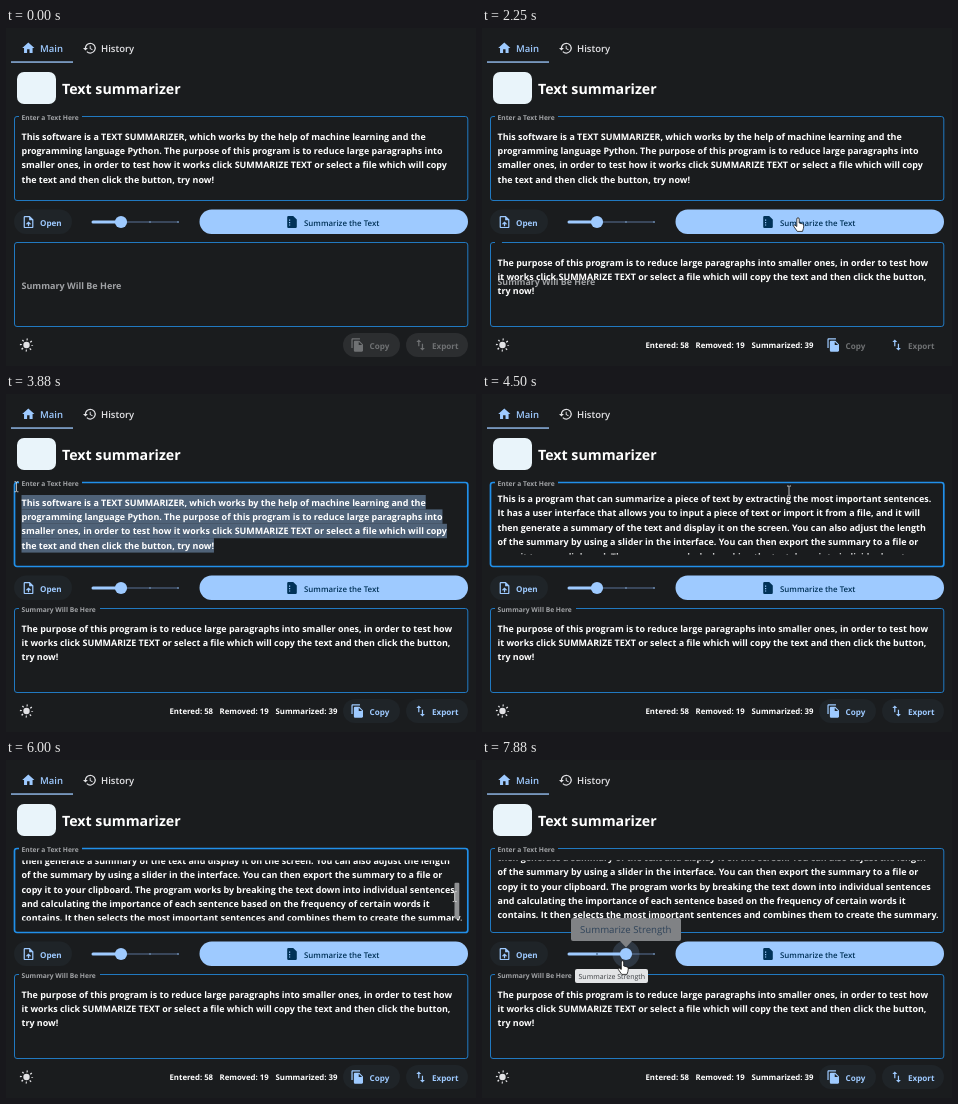
An HTML page that plays this animation: 470x338 px, repeating every 8 s.

```html
<!DOCTYPE html>
<html lang="en">
<head>
<meta charset="utf-8">
<title>Text summarizer</title>
<style>
  html, body { margin: 0; width: 100%; height: 100%; overflow: hidden; background: #1a1c1e; }
  svg { display: block; width: 100vw; height: 100vh; font-family: "Open Sans", "Noto Sans", sans-serif; text-rendering: geometricPrecision; }
  .body { font-size: 8.95px; font-weight: 700; fill: #fff; }
  .tab { font-size: 9.5px; font-weight: 600; }
  .label { font-size: 6.7px; font-weight: 700; fill: #a0a2a5; }
  .btn { font-size: 8.1px; font-weight: 700; }
  .stat { font-size: 7.8px; font-weight: 700; fill: #fff; }
  .field { fill: none; stroke: #2179c1; }
  .field.focus { stroke: #2190ea; stroke-width: 1.7; }
  .accent { fill: #9ecaff; }
  .gap { fill: #1a1c1e; }
</style>
</head>
<body>
<svg viewBox="0 0 470 338">
  <defs>
    <clipPath id="view"><rect x="10" y="100.4" width="450" height="60.2"/></clipPath>
  </defs>

  <!-- tabs and title -->
  <path class="accent" transform="translate(15 12.7) scale(.61)" d="M10 20v-6h4v6h5v-8h3L12 3 2 12h3v8z"/>
  <text class="tab accent" x="34" y="23.8">Main</text>
  <rect class="accent" x="5" y="33.4" width="62" height="1.3"/>
  <path fill="#e2e2e5" transform="translate(76.4 12.8) scale(.61)" d="M13 3a9 9 0 0 0-9 9H1l4 4 4-4H6a7 7 0 1 1 2 5l-1.4 1.4A9 9 0 1 0 13 3zm-1 5v5l4.3 2.5.7-1.2-3.5-2.1V8z"/>
  <text class="tab" fill="#e2e2e5" x="95" y="23.8">History</text>
  <rect x="11" y="44" width="39" height="32" rx="7" fill="#e9f4fa"/>
  <text x="56" y="66" font-size="14.2" font-weight="700" fill="#fff">Text summarizer</text>

  <!-- input -->
  <rect id="inBox" class="field" x="8.5" y="88.5" width="453.3" height="84" rx="2.5"/>
  <rect class="gap" x="13" y="87" width="63" height="4"/>
  <text class="label" x="15.5" y="92.2">Enter a Text Here</text>
  <g clip-path="url(#view)">
    <g id="sel" fill="#9ecaff" opacity=".4"></g>
    <g id="shortText" class="body"></g>
    <g id="longText" class="body"></g>
  </g>
  <rect id="thumb" x="448.5" y="100" width="4.8" height="36" rx="1" fill="#8f9193"/>

  <!-- controls -->
  <rect x="8" y="181.5" width="58" height="24.5" rx="12.2" fill="#1f2428"/>
  <path class="accent" transform="translate(15.2 186.7) scale(.61)" d="M14 2H6a2 2 0 0 0-2 2v16c0 1.1.9 2 2 2h12a2 2 0 0 0 2-2V8l-6-6zm4 18H6V4h7v5h5v11zM8 15l1.4 1.4 1.6-1.6V19h2v-4.2l1.6 1.6L16 15l-4-4z"/>
  <text class="btn accent" x="34" y="197.5">Open</text>
  <rect x="193.5" y="181.5" width="268.5" height="24.5" rx="12.2" class="accent"/>
  <path fill="#003258" fill-rule="evenodd" transform="translate(278.8 186.8) scale(.6)" d="M14 2H6a2 2 0 0 0-2 2v16a2 2 0 0 0 2 2h12a2 2 0 0 0 2-2V8zM7 8h2v2H7zM7 12h2v2H7zM7 16h2v2H7z"/>
  <text x="298" y="197.5" font-size="7.9" font-weight="600" fill="#003258">Summarize the Text</text>

  <!-- summary -->
  <rect class="field" x="8.5" y="214.5" width="453.3" height="84" rx="2.5"/>
  <rect id="outGap" class="gap" x="13" y="213" height="3"/>
  <text id="outLabel" class="label" x="15.5">Summary Will Be Here</text>
  <g id="outText" class="body"></g>

  <!-- footer -->
  <g fill="#e2e2e5">
    <circle cx="20.5" cy="317" r="3.2"/>
    <circle cx="20.5" cy="317" r="5.6" fill="none" stroke="#e2e2e5" stroke-width="2" stroke-dasharray="1.2 3.198" stroke-dashoffset=".6"/>
  </g>
  <g id="stats" class="stat">
    <text x="163.5" y="320.3">Entered: 58</text>
    <text x="213.5" y="320.3">Removed: 19</text>
    <text x="269.5" y="320.3">Summarized: 39</text>
  </g>
  <g class="out">
    <rect x="337" y="305" width="57" height="24" rx="12"/>
    <path transform="translate(344.2 309.7) scale(.61)" d="M16 1H4C2.9 1 2 1.9 2 3v14h2V3h12V1zm-1 4l6 6v10c0 1.1-.9 2-2 2H8a2 2 0 0 1-2-2V7c0-1.1.9-2 2-2h7zm-1 7h5.5L14 6.5V12z"/>
    <text class="btn" x="363.5" y="320.5">Copy</text>
  </g>
  <g class="out">
    <rect x="400" y="305" width="62" height="24" rx="12"/>
    <path transform="translate(407.3 309.7) scale(.61)" d="M9 3L5 7h3v7h2V7h3L9 3zm7 14v-7h-2v7h-3l4 4 4-4h-3z"/>
    <text class="btn" x="426" y="320.5">Export</text>
  </g>

  <!-- slider -->
  <path stroke="#39465a" stroke-width="2.2" stroke-linecap="round" d="M87 194H172"/>
  <path id="active" stroke="#9ecaff" stroke-width="3" stroke-linecap="round"/>
  <circle id="tick" cy="194" r=".9"/>
  <circle cx="172" cy="194" r=".9" fill="#6c89ad"/>
  <circle id="halo" cy="194" r="13.5" class="accent" opacity=".16"/>
  <circle id="knob" cy="194" r="6.1" class="accent"/>
  <g id="value">
    <path fill="#808285" d="M91 158H197a2 2 0 0 1 2 2V179a2 2 0 0 1-2 2H150L144 187.5 138 181H91a2 2 0 0 1-2-2V160a2 2 0 0 1 2-2z"/>
    <text x="98" y="173" font-size="9.65" fill="#2f445a">Summarize Strength</text>
  </g>
  <g id="hint">
    <rect x="93" y="209" width="73" height="14" rx="2" fill="#e3e4e6"/>
    <text x="96.5" y="218.7" font-size="7" fill="#3c3f43">Summarize Strength</text>
  </g>

  <!-- pointers -->
  <g id="pointer" fill="#fff" stroke="#111" stroke-width=".8" stroke-linejoin="round">
    <path id="arrow" d="M0 0v11l2.6-2.4 1.7 3.8 1.6-.7-1.7-3.7h3.5z"/>
    <path id="hand" d="M-1.2 1a1.2 1.2 0 0 1 2.4 0V5l3.4.9q1.3.4 1.2 2l-.4 2.6-.9 2.9h-5.2l-3.4-4.8q-.5-1.4.7-1.7l2.2 1.6z"/>
    <path id="beam" fill="none" stroke="#e8e8e8" d="M-2-5h1.4l.6.6.6-.6H2M0-4.4V4.4M-2 5h1.4L0 4.4l.6.6H2"/>
  </g>
</svg>
<script>
const $ = id => document.getElementById(id);
const LOOP = 8000, STEP = 125, LEAD = 14.4;

function make(parent, tag, attrs) {
  const el = document.createElementNS('http://www.w3.org/2000/svg', tag);
  set(el, attrs);
  return parent.appendChild(el);
}
function set(el, attrs) {
  for (const k in attrs) el.setAttribute(k, attrs[k]);
}
function show(id, on) { $(id).style.display = on ? '' : 'none'; }
function write(id, y, rows) {
  return rows.map((row, i) => {
    const el = make($(id), 'text', { x: 15.5, y: y + i * LEAD });
    el.textContent = row;
    return el;
  });
}

const rows = write('shortText', 111.5, [
  'This software is a TEXT SUMMARIZER, which works by the help of machine learning and the',
  'programming language Python. The purpose of this program is to reduce large paragraphs into',
  'smaller ones, in order to test how it works click SUMMARIZE TEXT or select a file which will copy',
  'the text and then click the button, try now!'
]);
write('longText', 107.9, [
  'This is a program that can summarize a piece of text by extracting the most important sentences.',
  'It has a user interface that allows you to input a piece of text or import it from a file, and it will',
  'then generate a summary of the text and display it on the screen. You can also adjust the length',
  'of the summary by using a slider in the interface. You can then export the summary to a file or',
  'copy it to your clipboard. The program works by breaking the text down into individual sentences',
  'and calculating the importance of each sentence based on the frequency of certain words it',
  'contains. It then selects the most important sentences and combines them to create the summary.'
]);
write('outText', 237.5, [
  'The purpose of this program is to reduce large paragraphs into smaller ones, in order to test how',
  'it works click SUMMARIZE TEXT or select a file which will copy the text and then click the button,',
  'try now!'
]);
const marks = rows.map((_, i) => make($('sel'), 'rect', { y: 101 + i * LEAD, height: LEAD }));

const clamp = v => Math.min(1, Math.max(0, v));
const ease = (t, from, to) => {
  const p = clamp((t - from) / (to - from));
  return p * p * (3 - 2 * p);
};
const mix = (a, b, p) => a + (b - a) * p;

// time, x, y
const path = [
  [300, 395, 312], [900, 340, 186], [1750, 318, 186], [2125, 316, 190], [2500, 316, 190],
  [3125, 228, 163], [3500, 225, 158], [3900, 8, 92], [4125, 60, 95], [4500, 307, 97],
  [5000, 458, 125], [5625, 447, 145], [6125, 449, 135], [6375, 449, 121], [6750, 200, 165],
  [7000, 118, 196], [7250, 118, 197], [7500, 141, 200], [7875, 140.5, 201]
];
function pointerAt(t) {
  const i = path.findIndex(k => k[0] >= t);
  if (i < 1) return path[i < 0 ? path.length - 1 : 0].slice(1);
  const [a, b] = [path[i - 1], path[i]], p = ease(t, a[0], b[0]);
  return [mix(a[1], b[1], p), mix(a[2], b[2], p)];
}
function pointerKind(x, y) {
  const within = (l, t, r, b) => x > l && x < r && y > t && y < b;
  if (within(9, 90, 461, 172) || within(9, 215, 461, 298)) return 'beam';
  if (within(80, 182, 180, 206) || within(194, 182, 462, 206)) return 'hand';
  return 'arrow';
}

function draw(t) {
  const [x, y] = pointerAt(t), kind = pointerKind(x, y);
  show('pointer', t >= 300);
  set($('pointer'), { transform: `translate(${x} ${y})` });
  for (const k of ['arrow', 'hand', 'beam']) show(k, k === kind);

  // input text, selection and scrolling
  const focused = t >= 3625 && t < 7250, pasted = t >= 4125;
  $('inBox').classList.toggle('focus', focused);
  show('shortText', !pasted);
  show('longText', pasted);
  show('sel', focused && !pasted);
  const head = t > 3900 ? [0, 15] : [Math.floor((y - 101) / LEAD), x];
  marks.forEach((m, i) => {
    const end = 15.5 + rows[i].getComputedTextLength();
    const start = i > head[0] ? 15.5 : Math.max(15.5, head[1]);
    set(m, { x: start, width: i < head[0] ? 0 : Math.max(0, end - start) });
  });
  const scroll = 28.8 * ease(t, 4900, 5400) + 7.2 * ease(t, 5850, 6125);
  set($('longText'), { transform: `translate(0 ${-scroll})` });
  set($('thumb'), { y: 100 + scroll / 36 * 25, opacity: ease(t, 4750, 4900) * (1 - ease(t, 6500, 6900)) });

  // summary and footer
  const done = t >= 2250, ready = t >= 2375, lift = ease(t, 2223, 2373);
  show('outText', done);
  show('stats', done);
  set($('outLabel'), { y: mix(260.5, 217.6, lift), style: `font-size:${mix(9, 6.7, lift)}px` });
  set($('outGap'), { width: 81 * lift });
  for (const g of document.querySelectorAll('.out')) {
    const [pill, icon, label] = g.children;
    set(pill, { fill: ready ? '#1f2428' : done ? 'none' : '#2c2e30' });
    set(icon, { fill: done ? '#9ecaff' : '#6f7173' });
    set(label, { fill: ready ? '#9ecaff' : '#6f7173' });
  }

  // slider
  const moved = ease(t, 7375, 7500), knob = mix(115, 144, moved);
  set($('active'), { d: `M87 194H${knob}` });
  set($('knob'), { cx: knob });
  set($('halo'), { cx: knob });
  set($('tick'), moved > .5 ? { cx: 115, fill: '#4a6c94' } : { cx: 144, fill: '#6c89ad' });
  show('halo', t >= 7000);
  show('value', t >= 7250);
  set($('value'), { transform: `translate(${knob - 144} 0)` });
  show('hint', t >= 7500);
}

const begin = performance.now();
function tick() {
  const t = (performance.now() - begin) % LOOP;
  draw(Math.floor(t / STEP) * STEP);
  requestAnimationFrame(tick);
}
tick();
</script>
</body>
</html>
```
